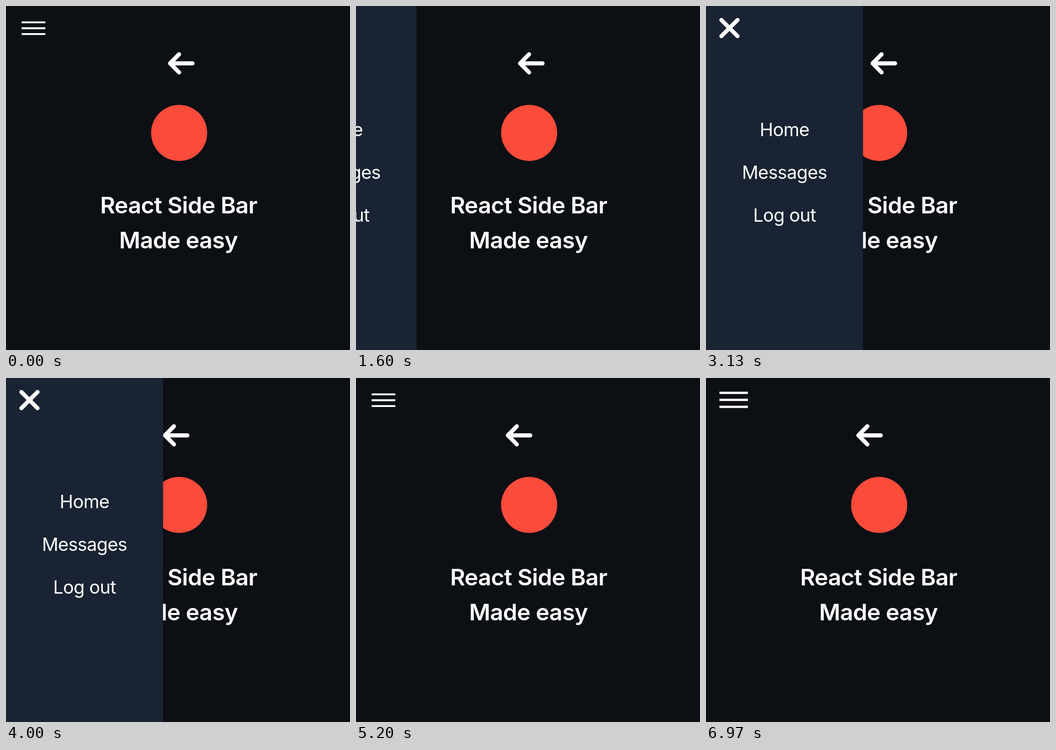
An HTML page for the animation above (7010 ms loop, 748 px wide and 748 px high).

```html
<!DOCTYPE html>
<html lang="en">
<head>
<meta charset="utf-8">
<title>Side bar</title>
<style>
  html, body { margin: 0; width: 100%; height: 100%; overflow: hidden; background: #0c0f14; }
  svg { display: block; width: 100vw; height: 100vh; }
  text { font-family: Inter, "Open Sans", sans-serif; fill: #fff; text-anchor: middle; }
  .title { font-size: 50px; font-weight: 600; letter-spacing: -.65px; }
  .item { font-size: 39.5px; letter-spacing: -.7px; }
  .icon { fill: none; stroke: #fff; stroke-linecap: round; stroke-linejoin: round; }
</style>
</head>
<body>
<svg viewBox="0 0 748 748">
  <path id="burger" d="M34 35.5H85.5M34 48.3H85.5M34 61H85.5" fill="none" stroke="#fff" stroke-width="4.2"/>
  <circle cx="376.5" cy="276" r="61" fill="#fb4b3b"/>
  <text class="title" x="375.5" y="450.5">React Side Bar</text>
  <text class="title" x="375" y="527">Made easy</text>
  <path id="arrow" class="icon" d="M19.5 -19.7L0 0L19.5 19.7M0 0H48.7" stroke-width="9"/>
  <g id="panel">
    <rect width="341.5" height="748" fill="#1a2333"/>
    <path id="cross" class="icon" d="M35 32L67 64M67 32L35 64" stroke-width="8"/>
    <text class="item" x="170.7" y="283">Home</text>
    <text class="item" x="170.7" y="376">Messages</text>
    <text class="item" x="170.7" y="469">Log out</text>
  </g>
</svg>
<script>
const LOOP = 7010, WIDTH = 341.5, SWING = 1600;
const [burger, arrow, panel, cross] =
  ["burger", "arrow", "panel", "cross"].map(id => document.getElementById(id));

// Eased 0..1 progress from a start time over a duration
const ramp = (t, start, length) => {
  const p = Math.min(1, Math.max(0, (t - start) / length));
  return (1 - Math.cos(Math.PI * p)) / 2;
};
const move = (el, x, y = 0) => el.setAttribute("transform", `translate(${x} ${y})`);
const scale = (el, s, x, y) =>
  el.setAttribute("transform", `translate(${x} ${y}) scale(${s}) translate(${-x} ${-y})`);

function draw(now) {
  const t = now % LOOP;
  const swing = (1 - Math.cos(2 * Math.PI * (t - 467) / SWING)) / 2;
  move(arrow, 329.5 + 43.5 * swing, 124.7);

  const open = ramp(t, 1473, 300) - ramp(t, 4885, 300);
  move(panel, WIDTH * (open - 1));

  // Icons grow while the pointer is over them
  const hover = t < 3000 ? ramp(t, 1100, 150) : ramp(t, 5210, 150);
  scale(burger, 1 + .2 * hover, 58, 52);
  scale(cross, 1 + .1 * ramp(t, 2300, 150), 51, 48);
  requestAnimationFrame(draw);
}
requestAnimationFrame(draw);
</script>
</body>
</html>
```
